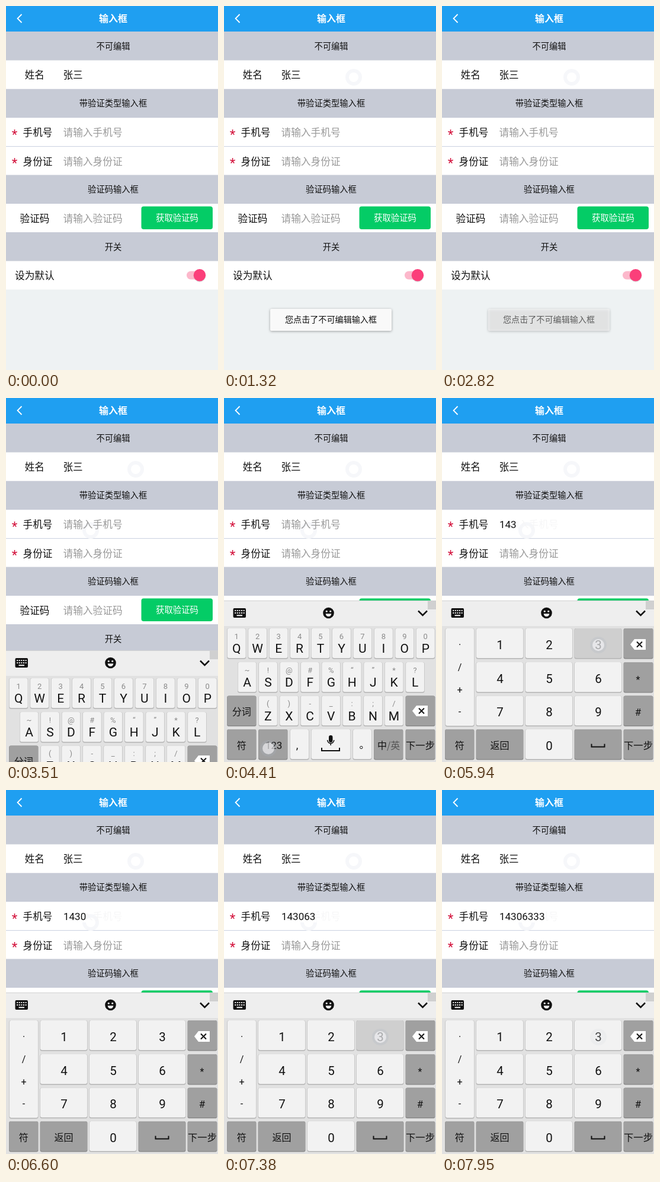
Write an HTML page with a canvas that moves like this. It is 358x613 px and loops after 8 s.

```html
<!DOCTYPE html>
<html lang="zh-CN">
<head>
<meta charset="utf-8">
<title>输入框</title>
<style>
html, body { margin: 0; width: 100%; height: 100%; overflow: hidden; background: #eef2f3; }
canvas { display: block; width: 358px; height: 613px; }
</style>
</head>
<body>
<canvas id="stage"></canvas>
<script>
const W = 358, H = 613, LOOP = 8000;
const canvas = document.getElementById('stage');
const c = canvas.getContext('2d');
const dpr = window.devicePixelRatio || 1;
canvas.width = W * dpr;
canvas.height = H * dpr;

const CJK = '"Noto Sans CJK SC", "Noto Sans CJK", sans-serif';
const LATIN = 'Roboto, "Noto Sans CJK SC", sans-serif';
const GREY = '#c7cbd6', INK = '#111', HINT = '#999';
const LIGHT = '#f2f2f2', DARK = '#a0a0a0', DOWN = '#cfcfcf';

const clamp = v => Math.max(0, Math.min(1, v));
const ramp = (t, a, b) => clamp((t - a) / (b - a));

function box(x, y, w, h, fill, r = 0) {
  c.fillStyle = fill;
  c.beginPath();
  c.roundRect(x, y, w, h, r);
  c.fill();
}

function circle(x, y, r, fill) {
  c.fillStyle = fill;
  c.beginPath();
  c.arc(x, y, r, 0, 7);
  c.fill();
}

function line(pts, color, width) {
  c.strokeStyle = color;
  c.lineWidth = width;
  c.beginPath();
  pts.forEach(([x, y]) => c.lineTo(x, y));
  c.stroke();
}

// y is the visual middle of the glyphs
function text(s, x, y, size, color = INK, align = 'center', font = CJK, weight = 400) {
  c.font = `${weight} ${size}px ${font}`;
  c.fillStyle = color;
  c.textAlign = align;
  c.fillText(s, x, y + size * (font === CJK ? 0.38 : 0.355));
}

function ring(x, y) {
  c.strokeStyle = '#f6f7fa';
  c.lineWidth = 6;
  c.beginPath();
  c.arc(x, y, 11, 0, 7);
  c.stroke();
}

// Touch marker: quick appearance, short fade after release
function touch(t, x, y, from, to) {
  const a = t < from ? 0 : 1 - ramp(t, to - 90, to);
  if (!a) return;
  c.globalAlpha = a;
  circle(x, y, 14, 'rgba(170,178,195,.2)');
  circle(x, y, 10, 'rgba(250,250,252,.6)');
  c.globalAlpha = 1;
}

/* ---------- typing ---------- */

const NUMBER = '14306333';
const TAPS = [5010, 5460, 5850, 6330, 6930, 7290, 7530, 7770];
const typedAt = t => NUMBER.slice(0, TAPS.filter(s => t >= s + 90).length);

function pressed(t) {
  const i = TAPS.findIndex(s => t >= s && t < s + 120);
  return i < 0 ? '' : NUMBER[i];
}

/* ---------- form ---------- */

function section(label, y) {
  box(0, y, W, 48.5, GREY);
  text(label, 181, y + 24.3, 14.3);
}

function field(label, x, y, hint, required) {
  text(label, x, y, 16.6);
  if (required) text('*', 14.5, y + 3, 22, '#d3123c', 'center', LATIN);
  if (hint) text(hint, 96.5, y, 16.7, HINT, 'left');
}

function form(t) {
  box(0, 0, W, H, '#eef2f3');
  box(0, 43, W, 434.5, '#fff');
  box(0, 0, W, 43, '#1f9ff1');
  line([[26.5, 14], [19.5, 21], [26.5, 28]], '#fff', 1.8);
  text('输入框', 181, 21, 16, '#fff', 'center', CJK, 700);

  section('不可编辑', 43);
  section('带验证类型输入框', 139.7);
  section('验证码输入框', 284.5);
  section('开关', 381);
  box(0, 236, W, 1, '#cbd1e0');

  if (t >= 780) ring(219, 120);
  if (t >= 3000) ring(143, 223);

  field('姓名', 48.3, 116);
  text('张三', 96.5, 115.5, 16.6, INK, 'left');

  const typed = typedAt(t);
  field('手机号', 53.5, 213, typed ? '' : '请输入手机号', true);
  if (typed) {
    text('请输入手机号', 96.5, 213, 16.7, '#f6f6f7', 'left');
    c.font = `17px ${LATIN}`;
    box(96, 203, c.measureText(typed).width + 3, 20, '#fff');
    text(typed, 97, 213, 17, INK, 'left', LATIN);
  }
  field('身份证', 53.5, 261.5, '请输入身份证', true);
  field('验证码', 48.5, 357.5, '请输入验证码');

  box(228.5, 337.5, 120.5, 38.5, '#04cc66', 4);
  text('获取验证码', 289, 357, 14.4, '#fff');

  text('设为默认', 15, 454, 16.7, INK, 'left');
  box(305, 446.5, 29, 14, '#fcb8cb', 7);
  circle(327, 454.5, 10.3, 'rgba(0,0,0,.15)');
  circle(327, 453.3, 10.2, '#fb3f7a');
}

function toast(t) {
  const a = ramp(t, 930, 1320) * (1 - ramp(t, 2715, 3000));
  if (!a) return;
  c.globalAlpha = a;
  c.shadowColor = 'rgba(0,0,0,.35)';
  c.shadowBlur = 4 * dpr;
  c.shadowOffsetY = dpr;
  box(78, 510, 205, 37, '#f9f9f9', 2);
  c.shadowColor = 'transparent';
  text('您点击了不可编辑输入框', 180.5, 528, 14.1);
  c.globalAlpha = 1;
}

/* ---------- keyboard, drawn with its top edge at y = 0 ---------- */

const ROWS = [47, 104, 160.5, 217];
const KEY_H = 50;

function key(x, w, row, fill = LIGHT, h = KEY_H) {
  const y = ROWS[row];
  box(x - .5, y, w + 1, h + 1.5, fill === DARK ? '#8c8c8c' : '#b4b4b4', 3);
  box(x, y, w, h, fill, 3);
}

function darkKey(x, w, row, label, size = 16) {
  key(x, w, row, DARK);
  if (label) text(label, x + w / 2, ROWS[row] + 26.5, size);
}

function letters(keys, hints, x0, row) {
  [...keys].forEach((ch, i) => {
    const x = x0 + i * 35.45;
    key(x - 15.5, 31, row);
    text([...hints][i], x, ROWS[row] + 13, 13, '#8a8a8a', 'center', LATIN);
    text(ch, x, ROWS[row] + 34, 21, INK, 'center', LATIN);
  });
}

function backspace(y) {
  c.fillStyle = '#fff';
  c.beginPath();
  [[318, 0], [325, -9], [344, -9], [344, 9], [325, 9]].forEach(([x, d]) => c.lineTo(x, y + d));
  c.fill();
  line([[329, y - 4.5], [338, y + 4.5]], INK, 2);
  line([[338, y - 4.5], [329, y + 4.5]], INK, 2);
}

function spaceMark(x1, x2, y) {
  line([[x1, y - 5], [x1, y], [x2, y], [x2, y - 5]], INK, 2);
}

function toolbar() {
  box(0, 0, W, 272, '#e1e1e1');
  box(0, 0, W, 43, '#eee');
  box(0, 0, W, 1, '#d2d2d2');

  box(15.5, 13, 21.5, 16, INK, 2);
  for (let r = 0; r < 2; r++)
    for (let i = 0; i < 5; i++) box(18.2 + i * 3.6, 16 + r * 4, 2, 2, '#eee');
  box(21.5, 24.2, 9.5, 2, '#eee');

  circle(176.5, 21, 9.3, INK);
  circle(173.3, 18.3, 1.5, '#eee');
  circle(179.7, 18.3, 1.5, '#eee');
  c.fillStyle = '#eee';
  c.beginPath();
  c.arc(176.5, 22.3, 4.8, 0, Math.PI);
  c.fill();

  box(344, 1, 14, 14, '#d0d0d0');
  line([[328, 17.5], [335.5, 25], [343, 17.5]], INK, 2.5);
}

function letterPad() {
  letters('QWERTYUIOP', '1234567890', 21.2, 0);
  letters('ASDFGHJKL', '~!@#%“”*?', 39, 1);
  letters('ZXCVBNM', '()-_:;/', 74.3, 2);
  darkKey(5.5, 48.5, 2, '分词');
  darkKey(307, 49, 2);
  backspace(186);
  darkKey(5.5, 48.5, 3, '符');
  darkKey(58.5, 48.5, 3);
  text('123', 84, 243.5, 17, INK, 'center', LATIN);
  key(112, 31, 3);
  text(',', 123.5, 244, 18, INK, 'center', LATIN);
  key(147.5, 66, 3);
  box(177, 227, 6.5, 12, INK, 3.2);
  c.strokeStyle = INK;
  c.lineWidth = 1.5;
  c.beginPath();
  c.arc(180.2, 235, 5.6, 0, Math.PI);
  c.stroke();
  line([[180.2, 240.5], [180.2, 244]], INK, 1.5);
  spaceMark(165, 195, 253);
  key(218, 31, 3);
  text('。', 237, 243, 17);
  darkKey(253.5, 48.5, 3);
  text('中', 259, 243.5, 16, INK, 'left');
  text('/英', 275, 243.5, 16, '#555', 'left');
  darkKey(307, 49, 3, '下一步', 16.3);
}

function numberPad(down) {
  const fill = d => d === down ? DOWN : LIGHT;
  key(6, 48, 0, LIGHT, 164);
  ['·', '/', '+', '-'].forEach((s, i) =>
    text(s, 30, 74.5 + i * 37.7, 16, INK, 'center', LATIN));
  for (let i = 0; i < 9; i++) {
    const x = 58 + i % 3 * 83, row = Math.floor(i / 3), d = String(i + 1);
    key(x, 79, row, fill(d));
    text(d, x + 40, ROWS[row] + 27.5, 20.5, INK, 'center', LATIN);
  }
  darkKey(307, 49, 0);
  backspace(74);
  darkKey(307, 49, 1);
  text('*', 331, 133, 16, INK, 'center', LATIN);
  darkKey(307, 49, 2);
  text('#', 331, 188, 17, INK, 'center', LATIN);
  darkKey(5.5, 48.5, 3, '符');
  darkKey(58, 79, 3, '返回');
  key(141, 79, 3, fill('0'));
  text('0', 181, 244.5, 20.5, INK, 'center', LATIN);
  darkKey(224, 79, 3);
  spaceMark(252.5, 274.5, 246.5);
  darkKey(307, 49, 3, '下一步', 16.3);
}

function keyboardTop(t) {
  const q = Math.floor(t / 30) * 30;
  return q <= 3510
    ? 613 - 188 * ramp(q, 3300, 3510)
    : 425 - 84 * ramp(q, 3540, 3660);
}

function keyboard(t) {
  if (t < 3330) return;
  c.save();
  c.translate(0, keyboardTop(t));
  toolbar();
  if (t < 4500) letterPad();
  else numberPad(pressed(t));
  c.restore();
}

function touches(t) {
  touch(t, 219, 120, 720, 900);
  touch(t, 143, 222, 2970, 3180);
  touch(t, 75, 590, 4410, 4710);
  TAPS.forEach((s, i) => {
    const d = +NUMBER[i];
    const x = d ? 98 + (d - 1) % 3 * 83 : 181;
    const y = d ? 416 + Math.floor((d - 1) / 3) * 57 : 586;
    touch(t, x, y, s, s + 210);
  });
}

function draw(now) {
  const t = now % LOOP;
  c.setTransform(dpr, 0, 0, dpr, 0, 0);
  form(t);
  toast(t);
  keyboard(t);
  touches(t);
}

let start = null;
function tick(now) {
  if (start === null) start = now;
  draw(now - start);
  requestAnimationFrame(tick);
}
draw(0);
requestAnimationFrame(tick);
</script>
</body>
</html>
```
